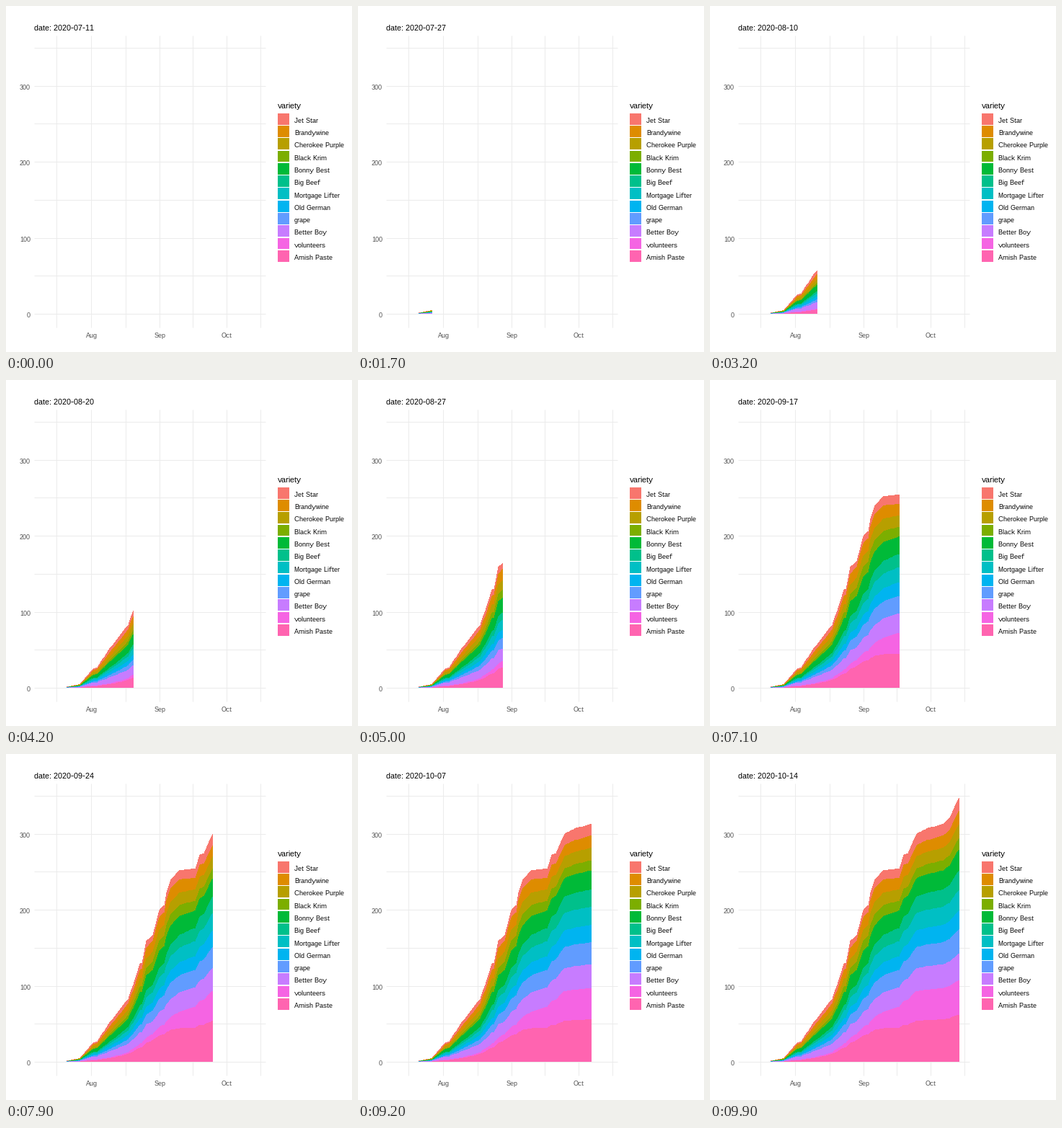
Write a matplotlib script that moves like this. It is 480x480 px and loops after 10000 ms.

```python
import matplotlib.pyplot as plt
import numpy as np
from matplotlib.animation import FuncAnimation

plt.rcParams.update({
    "font.family": "Liberation Sans",
    "text.hinting": "native",
    "text.hinting_factor": 1,
    "text.kerning_factor": 6,
})

SIZE, DPI = 480, 80
FRAMES, FIRST_DAY, LAST_DAY = 100, 10, 95
START = np.datetime64("2020-07-11")
LEFT, RIGHT, TOP, BOTTOM = 39, 360, 41, 446
GREY = "#4D4D4D"

# Colour, then share of the harvest in percent on each of SHARE_DAYS.
SHARE_DAYS = (30, 50, 75)
VARIETIES = {
    "Jet Star": ("#F8766D", 10, 4.5, 5),
    "Brandywine": ("#DE8C00", 10, 8.5, 5),
    "Cherokee Purple": ("#B79F00", 10, 7.3, 5.3),
    "Black Krim": ("#7CAE00", 4, 7, 4.2),
    "Bonny Best": ("#00BA38", 15, 11.5, 8),
    "Big Beef": ("#00C08B", 5, 6, 7.2),
    "Mortgage Lifter": ("#00BFC4", 7, 7.8, 7.6),
    "Old German": ("#00B4F0", 7, 6.5, 7.2),
    "grape": ("#619CFF", 6, 8.7, 9.2),
    "Better Boy": ("#C77CFF", 15, 9.8, 10),
    "volunteers": ("#F564E3", 2, 5, 13),
    "Amish Paste": ("#FF64B0", 9, 17.2, 17.8),
}

# Turning points of the cumulative harvest: day -> total.
TOTALS = {10: 1, 16: 5, 22: 25, 24: 27, 29: 50, 38: 83, 43: 129, 44: 130,
          46: 159, 49: 167, 52: 199, 54: 206, 55: 223, 57: 240, 61: 252,
          68: 254, 70: 272, 72: 274, 76: 300, 81: 307, 88: 313, 91: 321,
          95: 347}


def to_x(day):
    return 39.5 + (day + 4.75) * 3.0728


def to_y(value):
    return 427.6 - 1.055 * value


def stack(days):
    """Pixel columns and the layer edges from top to base."""
    total = np.interp(days, list(TOTALS), list(TOTALS.values()))
    share = np.array([np.interp(days, SHARE_DAYS, s)
                      for _, *s in VARIETIES.values()])
    share /= share.sum(axis=0)
    below = np.cumsum(share[::-1], axis=0)[::-1]
    below = np.vstack([below, np.zeros(len(days))])
    return np.floor(to_x(days)), np.floor(to_y(below * total))


def revealed_day(frame):
    """Each day lands on its nearest whole frame; in between it glides."""
    days = np.arange(LAST_DAY + 1)
    return np.interp(frame, np.round(days * (FRAMES - 1) / LAST_DAY), days)


fig = plt.figure(figsize=(SIZE / DPI, SIZE / DPI), dpi=DPI, facecolor="white")
ax = fig.add_axes([0, 0, 1, 1])
ax.set(xlim=(0, SIZE), ylim=(SIZE, 0))
ax.axis("off")


def label(x, y, text, px, color="black", ha="left"):
    return ax.text(x, y, text, fontsize=px * 72 / DPI, color=color,
                   ha=ha, va="baseline")


def grid_line(xs, ys):
    # Whole coordinates snap to the centre of their pixel.
    ax.plot(xs, ys, color="#EBEBEB", lw=72 / DPI, zorder=1,
            solid_capstyle="butt")


def draw_axes():
    for value in range(0, 351, 50):
        y = int(to_y(value))
        grid_line([LEFT, RIGHT], [y, y])
        if value % 100 == 0:
            label(34, y + 5, str(value), 9, GREY, "right")

    months = [to_x(d) for d in (-10, 21, 52, 82, 113)]
    middles = [(a + b) / 2 for a, b in zip(months, months[1:])]
    for x in months[1:4] + middles:
        grid_line([int(x)] * 2, [TOP, BOTTOM])
    for x, name in zip(months[1:4], ("Aug", "Sep", "Oct")):
        label(x, 460, name, 9, GREY, "center")


def draw_legend():
    label(377, 142, "variety", 11)
    for i, (name, (color, *_)) in enumerate(VARIETIES.items()):
        step = 17.28 * i
        top, bottom = int(149.25 + step), int(165.08 + step)
        ax.add_patch(plt.Rectangle((377, top), 16, bottom - top, fc=color,
                                   lw=0, antialiased=False))
        label(400, int(162.4 + step), name, 9)


draw_axes()
draw_legend()
title = label(LEFT, 34, "", 11)
layers = [
    ax.add_patch(plt.Polygon(np.zeros((3, 2)), fc=color, lw=0,
                             antialiased=False, zorder=2))
    for color, *_ in VARIETIES.values()
]


def update(frame):
    title.set_text(f"date: {START + LAST_DAY * frame // (FRAMES - 1)}")
    day = revealed_day(frame)
    xs, edges = stack(np.append(np.arange(FIRST_DAY, day), day))
    for layer, upper, lower in zip(layers, edges, edges[1:]):
        layer.set_visible(day > FIRST_DAY)
        layer.set_xy(np.column_stack([np.r_[xs, xs[::-1]],
                                      np.r_[upper, lower[::-1]]]))
    return [title, *layers]


anim = FuncAnimation(fig, update, frames=FRAMES, interval=100,
                     init_func=lambda: update(0), repeat=True)
plt.show()
```
